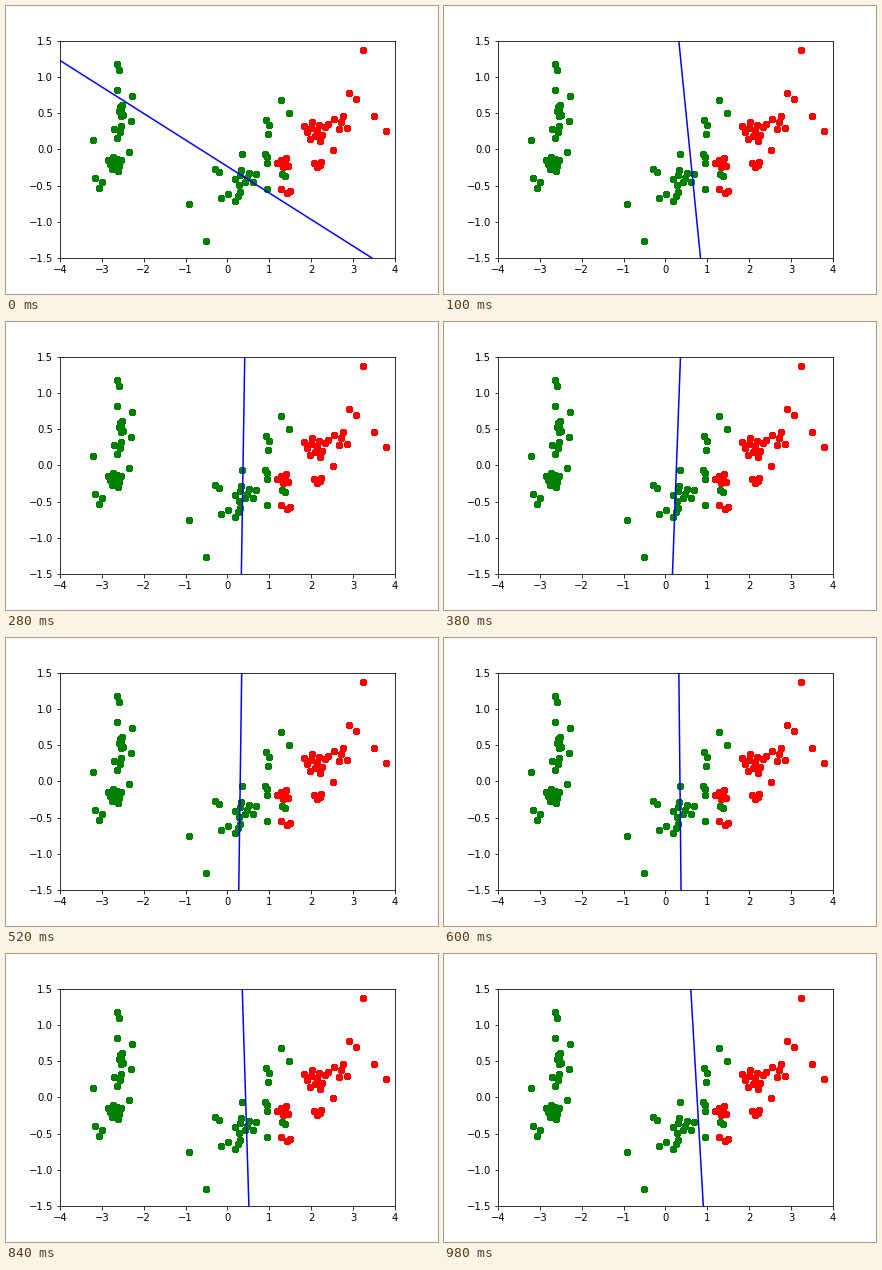
Animation of 432 by 288 pixels, one loop 1 s. Source, as a matplotlib script:

```python
import numpy as np
import matplotlib.pyplot as plt
from matplotlib.animation import FuncAnimation

FRAMES, INTERVAL = 50, 20
GOLDEN_ANGLE = np.pi * (3 - 5 ** .5)
OVERDRAW = 30  # stacked dots give solid, hard edges

# Each blob: number of dots, centre x, centre y, half width, half height.
GREEN_BLOBS = [
    (6, -2.55, .54, .06, .12),
    (4, -2.64, .24, .18, .11),
    (11, -2.69, -.19, .18, .12),
    (3, -3.07, -.45, .17, .10),
    (3, .96, .34, .09, .14),
    (3, .93, -.11, .06, .09),
    (2, -.24, -.31, .08, .07),
    (9, .40, -.39, .31, .13),
    (5, .15, -.65, .32, .10),
    (2, 1.34, -.37, .06, .06),
]
RED_BLOBS = [
    (11, 2.08, .26, .30, .16),
    (6, 2.64, .37, .28, .14),
    (4, 2.14, -.21, .18, .04),
    (6, 1.33, -.18, .16, .10),
    (3, 1.40, -.57, .22, .04),
]

# Dots that stand apart from the blobs.
GREEN_SINGLES = [(-2.645, 1.18), (-2.6, 1.09), (-2.635, .812), (-2.28, .74),
                 (-2.31, .39), (-3.216, .133), (-2.356, -.037),
                 (1.285, .685), (1.464, .504), (.358, -.069),
                 (.945, -.543), (-.906, -.756), (-.508, -1.266)]
RED_SINGLES = [(3.23, 1.374), (2.917, .783), (3.076, .688),
               (3.5, .46), (3.796, .257), (2.53, -.01)]

# Times (ms) at which the classifier takes a training step.
STEP_TIMES = np.r_[0:200:20, 200:441:60, 520, 580, 600:841:60, 900:981:20]

# Boundary wx * x + wy * y = bias; wx grows evenly, then stays.
WX_START, WX_END, WX_GROWTH = .3656, 5.78, 1.083
KEYS = np.array([(0, 1, -.237), (100, 1, 3.35), (180, .06, 2.79),
                 (380, -.37, 1.53), (600, .10, 2.01), (840, .306, 2.51),
                 (980, .578, 4.37)])
KEY_STEPS = np.searchsorted(STEP_TIMES, KEYS[:, 0])


def blob(count, x, y, half_width, half_height):
    """Dots spread evenly over an ellipse on a sunflower spiral."""
    i = np.arange(count)
    radius = np.sqrt((i + .5) / count)
    angle = i * GOLDEN_ANGLE
    return np.column_stack([x + half_width * radius * np.cos(angle),
                            y + half_height * radius * np.sin(angle)])


def draw_class(blobs, singles, color):
    points = np.vstack([singles, *(blob(*b) for b in blobs)])
    ax.scatter(*np.tile(points.T, OVERDRAW), color=color)


def boundary(ms):
    """Weights after the last training step taken by the given time."""
    step = np.searchsorted(STEP_TIMES, ms, side="right") - 1
    wx = min(WX_START + WX_GROWTH * step, WX_END)
    wy, bias = (np.interp(step, KEY_STEPS, column) for column in KEYS.T[1:])
    return wx, wy, bias


fig = plt.figure(figsize=(6, 4), dpi=72)
ax = fig.add_axes([.125, .125, .775, .755])
ax.set(xlim=(-4, 4), ylim=(-1.5, 1.5))
draw_class(GREEN_BLOBS, GREEN_SINGLES, "green")
draw_class(RED_BLOBS, RED_SINGLES, "red")

ys = np.array([-1.5, 1.5])
line, = ax.plot([], [], color="blue", lw=1.5)


def update(frame):
    wx, wy, bias = boundary(frame * INTERVAL)
    line.set_data((bias - wy * ys) / wx, ys)
    return line,


anim = FuncAnimation(fig, update, frames=FRAMES, interval=INTERVAL,
                     repeat=True, repeat_delay=0)
plt.show()
```
